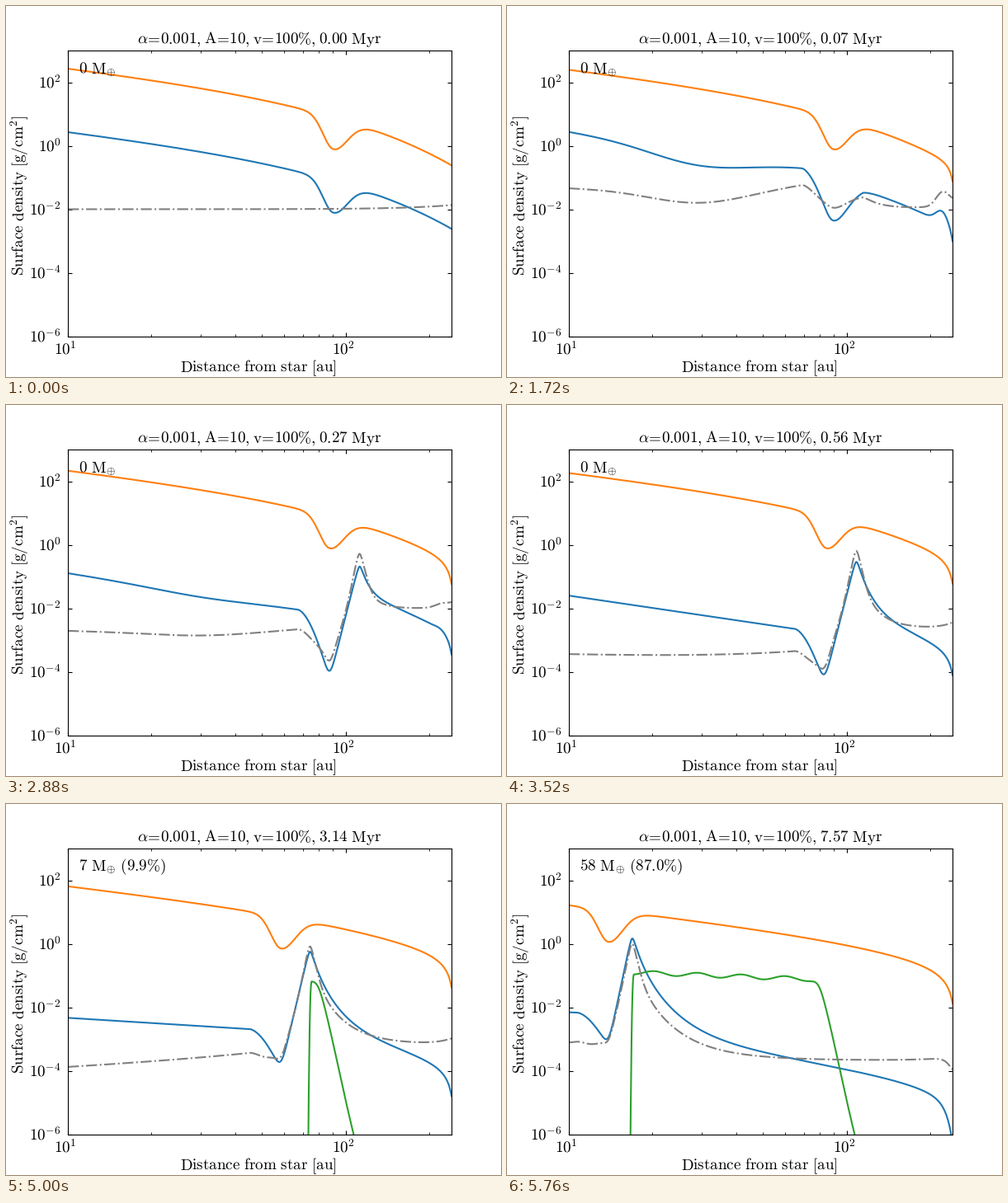
Write a matplotlib script that moves like this. It is 600 by 450 pixels and loops after 5.8 s.

```python
import numpy as np
import matplotlib.pyplot as plt
from matplotlib.animation import FuncAnimation

plt.rcParams.update({"mathtext.fontset": "cm", "text.hinting": "none", "font.size": 13.75})

W, H, FRAMES = 600, 450, 145
LEFT, RIGHT, TOP, BOTTOM = 75, 540, 54, 400.5
DECADE_X = (RIGHT - LEFT) / np.log10(24)
DECADE_Y = (BOTTOM - TOP) / 9
EARLY = 0.07  # Myr until the dust leaves its starting profile


def to_x(r):
    return LEFT + (np.log10(r) - 1) * DECADE_X


def to_y(dex):
    return TOP + (3 - dex) * DECADE_Y


def to_dex(y):
    return 3 - (y - TOP) / DECADE_Y


X = np.linspace(LEFT, RIGHT, 931)
R = 10 ** (1 + (X - LEFT) / DECADE_X)
LOG_R = np.log10(R)


def clock(n):
    return 7.57 * np.exp(-0.04635 * (FRAMES - 1 - n)) if n else 0.0


def gap_radius(t):
    return 91 - 10.17 * t


def gap_x(t):
    return to_x(gap_radius(t))


def ring_x(t):
    return gap_x(t) + 35 - 0.13 * t**2


def bell(x, centre, width):
    return np.exp(-((x - centre) / width) ** 2)


def total(*parts):
    return np.log10(sum(10**p for p in parts))


def pulse(t):
    return t / EARLY * np.exp(1 - t / EARLY)


def grip(t):
    """How far the pressure bump holds back the dust, 0 to 1."""
    return min(t / 0.27, 1) ** 2


def edge(t):
    depth = 0.8 + 18 * (1 - np.exp(-t / EARLY)) + 4.2 * t
    return np.log10(1 - np.exp(-(244.3 - R) / depth))


def gas(t):
    scale = 60 + 20.5 * t**0.78
    u = np.log(R / (gap_radius(t) / 1.01))
    gap = np.exp(-u**2 / (2 * np.where(u < 0, 0.085, 0.115) ** 2))
    return 3.5 - 0.278 * t**0.745 - LOG_R - R / scale / np.log(10) - gap + edge(t)


def inner_dust(t):
    fade = np.exp(-(max(t - EARLY, 0) / 0.38) ** 0.75)
    level = -2.5 + 0.045 * t + 2.95 * fade
    slope = max(1.45 - 0.29 * t, 0.3)
    sag = 0.45 * pulse(t) * bell(LOG_R, 1.48, 0.25)
    fall = 0.105 * t**-0.2 * np.maximum(X - gap_x(t) + 40, 0) ** 1.75
    return level - slope * (LOG_R - 1) - sag - fall / DECADE_Y


def ring_dust(t):
    d = X - ring_x(t)
    far = np.hypot(d, 2) - 2
    drop = np.where(d < 0, (3.9 + 0.12 * t) * far, 68 * np.log(1 + far / 18))
    peak = -0.54 + 0.094 * t - 0.0212 * t**-1.75
    return peak - drop / DECADE_Y + edge(t)


def outer_dust(t):
    lost = 2 + 0.1 * t + 1.25 * (1 - np.exp(-(t / 0.5) ** 2.5))
    blocked = 3.9 * grip(t) * np.maximum(ring_x(t) - X, 0) / DECADE_Y
    rim = 0.43 * pulse(t) * bell(X, 528, 11) - (t / 7.6) ** 4 * np.exp((X - RIGHT) / 6)
    return gas(t) - lost - blocked + rim


def dust(t):
    w = min(t / EARLY, 1)
    s = max(t, 0.005)
    moved = total(inner_dust(s), ring_dust(s), outer_dust(s))
    return (1 - w) * (gas(t) - 2) + w * moved


def ratio(t):
    """Dust to gas in the midplane, raised where the dust has settled."""
    w = min(t / EARLY, 1)
    inside = 1 / (1 + np.exp((X - ring_x(t)) / 15))
    boost = 0.26 + 0.4 * np.exp(-t / 0.6) * inside - 0.4 * np.exp(-t / 0.1) * (1 - inside)
    boost += (0.58 - 0.03 * t) * grip(t) * bell(X, ring_x(t), 12)
    boost += 0.18 * np.exp((X - RIGHT) / 15) - 0.28 * bell(X, gap_x(t), 20)
    start = -2 + 0.13 * np.exp((X - RIGHT) / 60)
    return (1 - w) * start + w * (dust(t) - gas(t) + boost)


def belt(t):
    """Rippled plateau left behind by the ring, with a steep outer end."""
    y = 204.5 + 0.038 * (X - 160) - 2.5 * np.cos(2 * np.pi * (X - 178) / 53)
    y += 4.25 * 3 * np.log1p(np.exp((X - 378) / 3))
    lag = np.maximum(ring_x(t) + 2 - X, 0) / 4.2
    return to_dex(np.minimum(y + 190 * lag**2.5, 600))


def belt_mass(t):
    return np.sum(10 ** belt(t) * R**2)


MASS_KEYS = [0, belt_mass(3.14), belt_mass(7.57)]


def roman(s):
    for a, b in ((", ", r",\:\!"), (" ", r"\ "), ("=", r"\!=\!"), ("%", r"\%")):
        s = s.replace(a, b)
    return r"$\mathrm{" + s + "}$"


def title_text(t):
    return roman(rf"\alpha=0.001, A=10, v=100%, {t:.2f} Myr")


def mass_text(t):
    share = np.interp(belt_mass(t), MASS_KEYS, [0, 9.9, 87.0])
    mass = 0.667 * share
    s = rf"{mass:.0f} M_{{\oplus}}"
    if mass >= 0.5:
        s += f" ({share:.1f}%)"
    return roman(s)


fig = plt.figure(figsize=(W / 100, H / 100), dpi=100, facecolor="white")
ax = fig.add_axes([LEFT / W, 1 - BOTTOM / H, (RIGHT - LEFT) / W, (BOTTOM - TOP) / H])
ax.set_xscale("log")
ax.set_yscale("log")
ax.set_yticks([1e-6, 1e-4, 1e-2, 1, 100])
ax.set_yticks([], minor=True)
ax.set_xlim(10, 240)
ax.set_ylim(1e-6, 1e3)
ax.tick_params(which="both", direction="in", top=True, right=True,
               labelbottom=False, labelleft=False)


def label(x, y, s, **kw):
    return fig.text(x / W, 1 - y / H, s, va="baseline", **kw)


for k in (1, 2):
    label(to_x(10**k) - 16.5, 423, roman(f"10^{{{k}}}"))
for k in (2, 0, -2, -4, -6):
    label(39 if k >= 0 else 28, to_y(k) + 7.2, roman(f"10^{{{k}}}"))
label(305.5, 444.6, roman("Distance from star [au]"), ha="center")
label(22, 229.5, roman("Surface density [g/cm^2]"), ha="center",
      rotation=90, rotation_mode="anchor")
title = label(307.5, 45.7, "", ha="center")
mass_label = label(88, 81.7, "")

CURVES = [(dust, "C0", "-"), (gas, "C1", "-"), (belt, "C2", "-"), (ratio, "gray", "-.")]
lines = [ax.plot([], [], color=c, ls=ls, lw=1.5)[0] for _, c, ls in CURVES]


def draw(n):
    t = clock(n)
    for line, (curve, _, _) in zip(lines, CURVES):
        line.set_data(R, 10 ** curve(t))
    title.set_text(title_text(t))
    mass_label.set_text(mass_text(t))
    return [*lines, title, mass_label]


anim = FuncAnimation(fig, draw, frames=FRAMES, interval=40, repeat=True)
plt.show()
```
